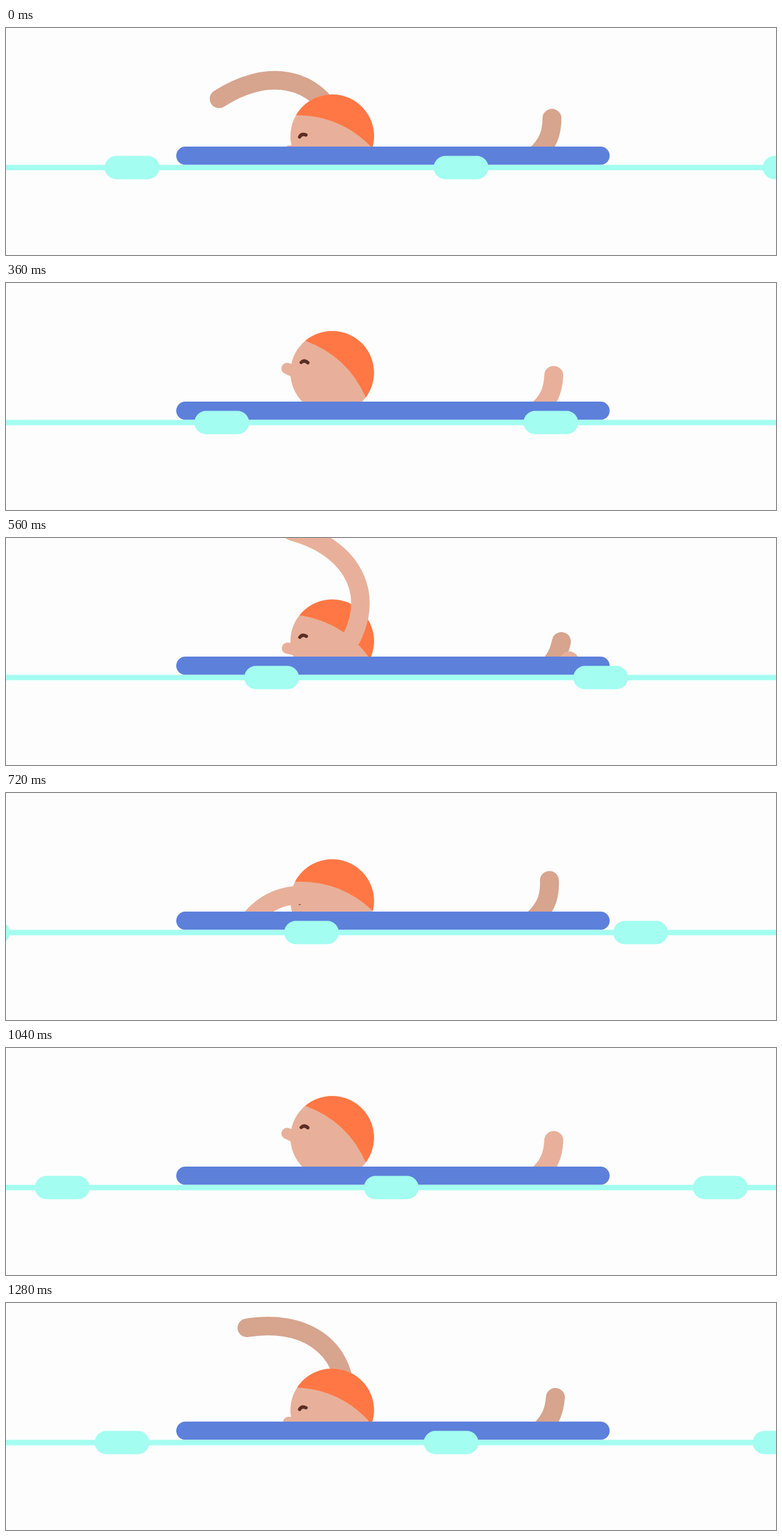
These frames come from a looping animation (1280 px wide and 379 px high, 1320 ms). An HTML page with a canvas:

```html
<!DOCTYPE html>
<html lang="en">
<head>
<meta charset="utf-8">
<title>Swimmer</title>
<style>
  html, body { margin: 0; width: 100%; height: 100%; overflow: hidden; background: #fdfdfd; }
  canvas { display: block; }
</style>
</head>
<body>
<canvas id="stage" width="1280" height="379"></canvas>
<script>
const ctx = document.getElementById('stage').getContext('2d');
const LOOP = 1320, STROKE = LOOP / 2, STEP = 40;
const SKIN = '#e8b09a', SHADE = '#d7a48e', CAP = '#ff7744', EYE = '#5b2e22';
const BAR = '#5d80db', LANE = '#a3fdf0';
const FLOAT_GAP = 547;

const mod = (a, n) => ((a % n) + n) % n;
const rad = degrees => degrees * Math.PI / 180;
const ease = u => (1 - Math.cos(Math.PI * Math.min(1, u))) / 2;

// Goes 0 -> 1 from `start` to `peak`, back to 0 at `end`, then rests.
function swing(t, start, peak, end) {
  const p = mod(t - start, STROKE), up = peak - start;
  return p < up ? ease(p / up) : 1 - ease((p - up) / (end - peak));
}

function stroke(path, color, width) {
  ctx.strokeStyle = color;
  ctx.lineWidth = width;
  ctx.stroke(new Path2D(path));
}

function pill(x, y, w, h, color) {
  ctx.fillStyle = color;
  ctx.beginPath();
  ctx.roundRect(x, y, w, h, h / 2);
  ctx.fill();
}

// A bent arm turns about the shoulder, slowest while it points up.
function drawArm(t, color) {
  const s = (mod(t, LOOP) - 560) / 100;
  if (s < -1.75 || s > 2.2) return;
  const turn = 22.8 + 32 * s + 16 * s * Math.abs(s) ** 1.25;
  const point = (radius, lag) => {
    const a = rad(turn - lag);
    return `${560 - radius * Math.sin(a)} ${190 - radius * Math.cos(a)} `;
  };
  stroke('M' + point(218, 0) + 'C' + point(178, 24) + point(122, 50) + point(28, 55), color, 31);
}

function drawLeg(degrees, color) {
  ctx.save();
  ctx.translate(808, 238);
  ctx.rotate(rad(degrees));
  stroke('M99 -88C99 -65 94 -45 70 -24', color, 31.5);
  ctx.restore();
}

function drawHead(t) {
  const tilt = rad(23 * (swing(t, 90, 370, 750) - 1));
  ctx.save();
  ctx.translate(542.3, 180.3 - 30.8 * swing(t, 40, 370, 660));
  // The nose dips a little further than the face.
  ctx.rotate(tilt * 1.25);
  stroke('M-75 -7L-62 -1', SKIN, 19);
  ctx.rotate(tilt * -0.25);
  ctx.fillStyle = SKIN;
  ctx.beginPath();
  ctx.arc(0, 0, 69.5, 0, 2 * Math.PI);
  ctx.fill();
  ctx.fillStyle = CAP;
  ctx.fill(new Path2D('M-44.7 -53.2Q26 -27 55.7 41.5A69.5 69.5 0 0 0 -44.7 -53.2Z'));
  stroke('M-51.5 -17Q-46.5 -22 -40.5 -16.5', EYE, 5.5);
  ctx.restore();
}

function draw(t) {
  ctx.fillStyle = '#fdfdfd';
  ctx.fillRect(0, 0, 1280, 379);
  ctx.lineCap = 'round';

  ctx.save();
  ctx.beginPath();
  ctx.rect(0, 0, 1280, 206);
  ctx.clip();
  drawArm(t - STROKE, SHADE);
  drawLeg(35.6 - 38 * swing(t, 330, 730, 990), SHADE);
  drawLeg(35.6 - 33.3 * swing(t, 35, 370, 655), SKIN);
  drawHead(t);
  drawArm(t, SKIN);
  ctx.restore();

  pill(283, 198, 720.5, 30.5, BAR);
  ctx.fillStyle = LANE;
  ctx.fillRect(0, 228.5, 1280, 9);
  const shift = 164 + FLOAT_GAP * t / LOOP;
  for (let i = -2; i < 3; i++) pill(shift + i * FLOAT_GAP, 213.5, 91, 39, LANE);
}

function tick() {
  draw(Math.floor(performance.now() % LOOP / STEP) * STEP);
  requestAnimationFrame(tick);
}
tick();
</script>
</body>
</html>
```
